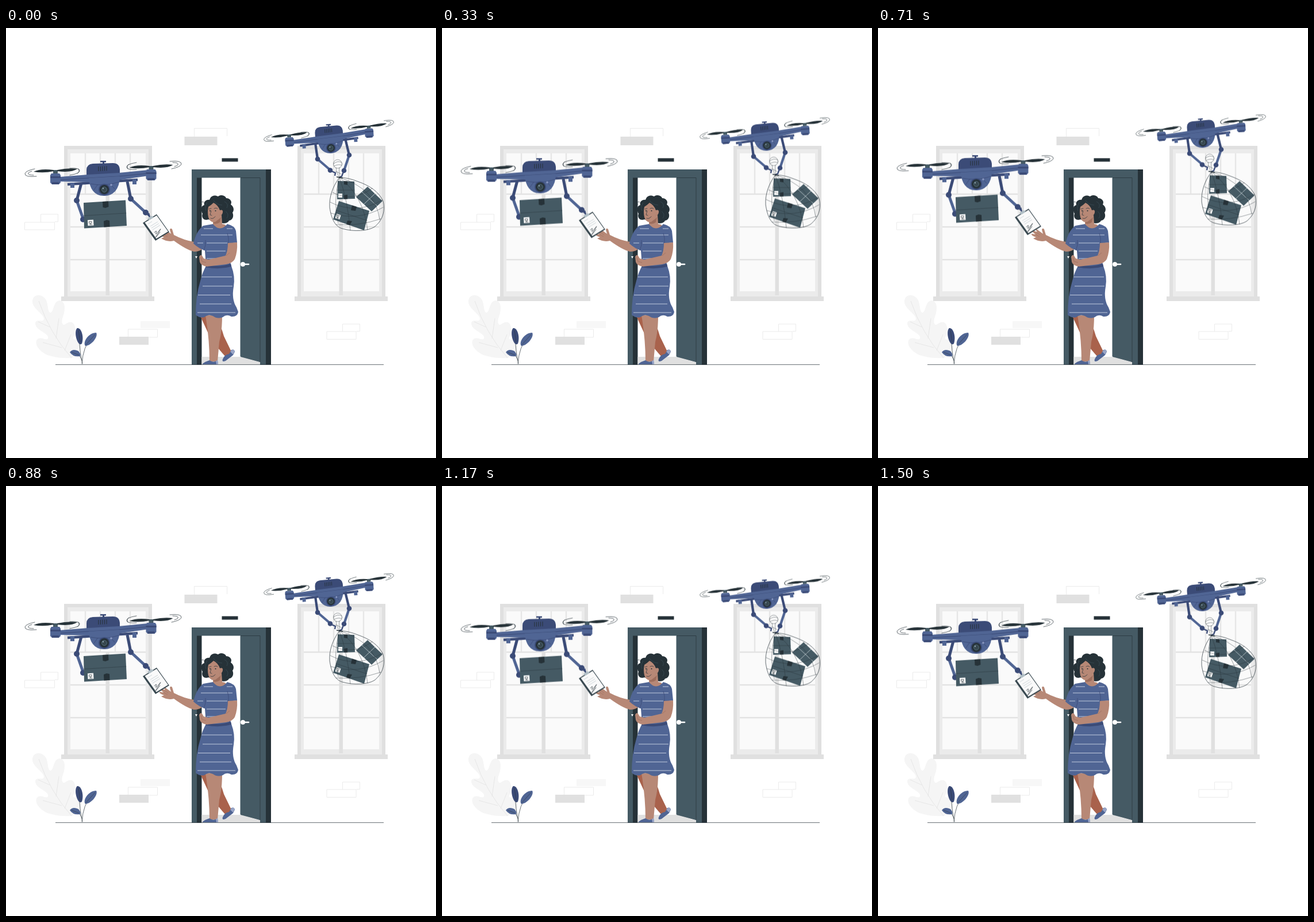
These frames come from a looping animation (748x748 px, 1540 ms). An HTML page without scripts:

```html
<!DOCTYPE html>
<html lang="en">
<head>
<meta charset="utf-8">
<title>Drone delivery</title>
<style>
  html, body { margin: 0; width: 100%; height: 100%; overflow: hidden; background: #fff; }
  svg { display: block; width: 100vw; height: 100vh; }
  .fly { animation: fly 1540ms linear infinite; }
  @keyframes fly {
    0%, 98.5%, 100% { transform: translateY(0); }
    47.4% { transform: translateY(-10px); }
  }
  .blue { fill: #506594; }
  .navy { fill: #3b4b77; }
  .slate { fill: #455a64; }
  .ink { fill: #263238; }
  .skin { fill: #b78876; }
  .grey { fill: #e0e0e0; }
  .pale { fill: #f5f5f5; }
  .line { fill: none; stroke: #263238; stroke-width: .7; stroke-linecap: round; stroke-linejoin: round; }
  .thin { stroke-width: .45; }
  .brick { fill: none; stroke: #ebebeb; stroke-width: 1; }
  .arm { fill: none; stroke: #506594; stroke-width: 5; stroke-linejoin: round; }
  .dark { stroke: #3b4b77; }
  .far .arm { stroke-width: 4.2; }
</style>
</head>
<body>
<svg viewBox="0 0 748 748" xmlns="http://www.w3.org/2000/svg">
  <defs>
    <g id="window">
      <path class="grey" d="M101 205h153v262H101z"/>
      <path fill="#ebebeb" d="M107 211h141v256H107z"/>
      <path fill="#fafafa" d="M112 218h131v240H112z"/>
      <path d="M138 218v71M164 218v71M190 218v71M216 218v71" stroke="#e6e6e6" stroke-width="2.4"/>
      <path d="M112 289h131M112 346h131M112 403h131" stroke="#e3e3e3" stroke-width="2.6"/>
      <path class="grey" d="M173.500 289h6.500v176h-6.500zM96 467h162v8H96z"/>
    </g>

    <g id="rotor">
      <path class="blue" d="M-7 4h14l2 3v13l-3 3H-6l-3-3V7z"/>
      <path class="navy" d="M-9 9H9v3H-9zM-6 19H6v4H-6z"/>
      <path class="slate" d="M-4-2h8v6h-8z"/>
      <path class="ink" d="M-3 0Q-20 4-38 1Q-26-5-3-2zM3-2Q22-6 38-4Q28 3 3 0z"/>
    </g>
    <path id="swirl" class="line" d="M33-9Q54-11 53-4Q51 1 36 4M38-7Q49-7 47-3Q45-1 41 0M-25-7Q-44-4-42 2Q-40 6-25 5M-38-4Q-43-2-40 4"/>

    <g id="drone">
      <path d="M107 272 229 264" stroke="#3b4b77" stroke-width="4.500"/>
      <path class="blue" d="M112 269h7v9h-7zM220 263h7v9h-7z"/>
      <path class="navy" d="M168 233h3v5h-3zM164 231h10v2.500h-10z"/>
      <path class="navy" d="M140 256V247Q140 237 151 236L186 235Q197 235 198 246V254z"/>
      <path class="blue" d="M93 259 143 255 196 252 247 247 248 257 200 264 142 268 94 267z"/>
      <path d="M95 264 144 261 196 258 247 253" fill="none" stroke="#3b4b77" stroke-width="1"/>
      <path class="blue" d="M144 261 198 258Q198 274 190 284Q181 293 170 292Q158 292 151 283Q145 275 144 261z"/>
      <path d="M147 271Q171 276 196 268M153 282Q158 274 160 272M189 280 182 272" fill="none" stroke="#3b4b77" stroke-width=".8"/>
      <path d="M161 241v8M164.500 241v8M168 240.700v8M171.500 240.500v8M175 240.300v8" stroke="#263238" stroke-width="1"/>
      <circle class="navy" cx="171" cy="281" r="10"/>
      <circle class="ink" cx="171" cy="281" r="8"/>
      <circle cx="171" cy="281" r="4.500" fill="#37474f" stroke="#607d8b" stroke-width=".7"/>
      <circle cx="169" cy="279" r="1.200" fill="#90a4ae"/>
      <circle cx="183" cy="273" r="1.800" fill="#8c9bc4"/>
      <use href="#rotor" x="86" y="249"/>
      <use href="#rotor" x="252.500" y="242"/>
      <use href="#swirl" transform="translate(86 249) rotate(180)"/>
      <use href="#swirl" x="252" y="241"/>
    </g>

    <g id="label">
      <path fill="#fff" d="M0 0 10-.5 10.500 9.500 .5 10z"/>
      <path class="line" d="M3 2.500h4v3H3zM5 6v2M3 8h5"/>
    </g>

    <path id="dress" d="M360 341Q372 356 385 341Q398 344 400 353L402 373 387 375Q386 396 392 414Q399 432 396 450Q392 472 401 486L404 494Q402 503 392 502Q384 497 377 503Q368 507 360 501Q352 497 345 503Q337 505 330 499Q330 466 338 440Q342 424 348 414L346 387Q336 384 326 375Q331 353 343 344z"/>
    <clipPath id="cloth"><use href="#dress"/></clipPath>
  </defs>

  <rect width="748" height="748" fill="#fff"/>

  <!-- Wall -->
  <use href="#window"/>
  <use href="#window" x="406"/>
  <path class="grey" d="M310.500 189h57v15h-57zM197 537h51v14h-51z"/>
  <path fill="#f7f7f7" d="M234 510h51v12h-51z"/>
  <path class="brick" d="M327.500 189v-14.500h57V188M32.500 338h52v13h-52zM60.500 338v-14h30v13h-6M212.500 537v-13h51v14h-15M558 528h51v13.500h-51zM585.500 528v-13h30v12.500h-6"/>
  <path class="ink" d="M375.500 226.500h28v6h-28z"/>

  <!-- Plants -->
  <path class="pale" d="M114 574Q95 575 80 571C60 567 48 550 54 542C60 535 70 545 73 540C76 530 50 527 51 513C53 505 65 513 66 506C66 497 45 488 46 475C47 463 61 461 69 472C74 480 72 496 78 495C84 492 82 474 94 474C106 477 102 495 98 505C96 515 99 519 105 514C115 507 122 515 120 528C119 537 114 540 119 542Q130 541 132 553Q131 567 114 574z"/>
  <path d="M57 475Q76 531 114 574M76 520 56 511M87 540 92 505M97 556 64 547M102 561 113 533" fill="none" stroke="#e0e0e0" stroke-width=".7"/>
  <path class="line" d="M127 532Q128 565 133 584M149 538Q134 554 132 584M117 564Q129 567 132 578"/>
  <path class="navy" d="M124 522C131 521 136 537 132 549Q129 552 126 548C121 541 119 526 124 522z"/>
  <path class="blue" d="M157 530C161 537 148 553 138 553C133 547 143 530 157 530zM111 564Q116 557 126 562Q131 568 129 571Q117 573 111 564z"/>
  <path d="M126 525 129 547M155 533 139 551M114 564 127 569" stroke="#263238" stroke-width=".5"/>

  <!-- Door -->
  <path class="slate" d="M323 246h138v340H323z"/>
  <path class="ink" d="M452 246h9v340h-9zM332 260.500h8.500V586H332z"/>
  <path fill="#fff" d="M340.500 260.500H408V586h-67.500z"/>
  <path class="grey" d="M340.500 572H408l34 9v5H340.500z"/>
  <path class="slate" d="M407.500 260.500H442V581l-34.500-10z"/>
  <path d="M442 581V260.500M408 260.500h34" fill="none" stroke="#263238" stroke-width=".7"/>
  <circle cx="412" cy="411" r="4" fill="#fff"/>
  <path d="M412 411h10" stroke="#fff" stroke-width="2.600" stroke-linecap="round"/>
  <path fill="#fff" d="M329 397h4l-2 4z"/>
  <path d="M86 585.600H657" stroke="#263238" stroke-width=".7"/>

  <!-- Woman -->
  <g>
    <path fill="#a9624c" d="M337 499 365 500Q373 515 379 536L394 567 383 573Q358 546 349 525z"/>
    <path class="blue" d="M377 576Q380 568 388 567L392 560Q397 558 398 563L395 569 382 579Q375 582 377 576z"/>
    <path fill="#9aa6c8" d="M390 563 395 559 398 562 395 568z"/>
    <path class="skin" d="M347 500H376Q376 528 371 546L368 580H354Q354 541 347 500z"/>
    <path class="blue" d="M342 584Q347 580 354 578Q361 583 368 578L369 585H342z"/>
    <path fill="#9aa6c8" d="M365 579 368 578 369 585H366z"/>

    <path class="ink" d="M354 299C356 291 364 290 369 293C374 289 382 292 383 296C390 296 394 302 391 307C397 311 397 318 394 321C397 328 394 334 388 335C385 341 374 341 370 337L352 333C345 336 339 330 342 323C338 317 339 309 345 308C343 303 348 298 354 299z"/>
    <path class="line" d="M344 303q-4-2-5 2M341 306q-4 2-1 4"/>
    <path class="skin" d="M360 330 375 325 376 341Q386 342 381 348Q370 356 360 344z"/>
    <path fill="#9d6e5d" d="M361 336Q369 335 374 329L372 338Q366 342 361 340z"/>
    <path class="skin" d="M352 311Q357 308 361 304Q369 308 372 317Q378 315 377 321Q376 326 372 326Q370 336 361 338Q354 337 352 329Q350 320 352 311z"/>
    <path class="line" d="M353 315l4-1M362 314q3-2 6 0M357 318l-2 7 3 1M356 331q4 2 8-3"/>
    <circle class="ink" cx="355" cy="318" r="1"/>
    <circle class="ink" cx="364.500" cy="318" r="1"/>
    <path d="M361 300q6 8 15 8M380 302q8 4 4 11M350 304q-5 7-2 14M382 319q7 5 2 12" fill="none" stroke="#455a64" stroke-width=".5"/>

    <path class="skin" d="M327 372Q309 369 292 360L289 350Q286 347 285 351L287 358 276 350Q273 350 277 355L269 352Q266 353 274 359L267 358Q266 361 275 364L270 366Q281 373 292 370Q314 386 327 389Q337 390 345 381z"/>
    <path d="M275 355 282 360M274 359 281 363" stroke="#9d6e5d" stroke-width=".6"/>

    <use href="#dress" class="blue"/>
    <g clip-path="url(#cloth)" stroke="#cfd6e6" stroke-width=".9" fill="none">
      <path d="M344 349h16M384 349h10M339 360h55M333 374h10M349 374h36M349 388h33M349 401h38M339 433h54M342 449h52M334 464.500h56M337 480h55M333 495h66"/>
    </g>
    <path class="navy" d="M349 412Q370 417 391 410L392 415Q371 421 347 416z"/>
    <path d="M344 387Q348 379 347 369M387 374Q388 365 385 357" fill="none" stroke="#3b4b77" stroke-width=".8"/>
    <path class="skin" d="M386 374 402 373Q403 389 398 402Q394 409 383 411L349 415Q339 413 337 407L336 398Q338 393 341 396L344 401 352 403 382 396Q386 387 386 374z"/>
    <path d="M339 399 341 406 348 408M383 396 389 391" fill="none" stroke="#9d6e5d" stroke-width=".7"/>
  </g>

  <!-- Near drone with parcel and clipboard -->
  <g class="fly">
    <path class="arm dark" d="M131 270 123 300"/>
    <path class="arm" d="M123 300 135 334"/>
    <path class="arm dark" d="M211 267 217 297"/>
    <path class="arm" d="M217 297 243 321"/>
    <g class="navy">
      <circle cx="123" cy="300" r="5"/><circle cx="134" cy="333" r="5"/>
      <circle cx="217" cy="297" r="5"/><circle cx="243" cy="321" r="5"/>
    </g>
    <path d="M243 321 250 328M248 322 250 329" stroke="#3b4b77" stroke-width="2.500"/>
    <use href="#drone"/>
    <path class="slate" d="M135 304 208 299.500 210 344 136 348.500z"/>
    <path class="line thin" d="M135.500 326.500 209 322"/>
    <path class="ink" d="M168 302 178 301.400 178.500 311 173 313 168.500 312zM170 336 175 334 180 335 180.500 345.800 170.500 346.500z"/>
    <use href="#label" x="142" y="334"/>
    <path fill="#37474f" d="M238 339 262 324 284 355 260 370z"/>
    <path fill="#fafafa" d="M241.500 338.500 262 326 282 354 261.500 366.500z"/>
    <path fill="#b0bec5" d="M246 331 254 326.500 257 329.500 249 334.500z"/>
    <path d="M247 341 254 336.500M251 345 264 337M253 348 266 340M255 351 268 343" stroke="#b0bec5" stroke-width=".6"/>
    <path class="line" d="M258 356q5-6 3 0t5-3-2 5 4-3"/>
  </g>

  <!-- Far drone with netted parcels -->
  <g class="fly far">
    <path class="arm dark" d="M538 200 542 228"/>
    <path class="arm" d="M542 228 564 247"/>
    <path class="arm dark" d="M590 192 597 221"/>
    <path class="arm" d="M597 221 588 248"/>
    <g class="navy">
      <circle cx="542" cy="228" r="4.300"/><circle cx="564" cy="247.500" r="4.300"/>
      <circle cx="597" cy="221" r="4.300"/><circle cx="588" cy="248" r="4.300"/>
    </g>
    <path d="M566 249 573 252 572 257M587 250 584 258 579 260" fill="none" stroke="#3b4b77" stroke-width="2.300"/>
    <use href="#drone" transform="translate(562.500 193) rotate(-4) scale(.836) translate(-169 -262)"/>

    <path class="slate" d="M577 266 606 267 607 297 576 298z"/>
    <path class="ink" d="M588 266.400 594 266.600 594 273 588 272zM588 291 594 290 594 297.400 588 297.600z"/>
    <path class="slate" d="M629 276 655 301 636 319 609 294z"/>
    <path d="M619 285 646 310M642 288 622 307" stroke="#cfd8dc" stroke-width=".8"/>
    <path class="slate" d="M579 301 632 318 623 352 569 333z"/>
    <path class="line thin" d="M574 317 628 335M576 282 606 282"/>
    <path class="ink" d="M602 308.500 610 311 608 318 600 317zM594 335 602 336 598 343 592 341z"/>
    <g transform="translate(575 323) rotate(20) scale(.8)"><use href="#label"/></g>
    <path fill="#fff" d="M578 288h7v7h-7z"/>
    <path class="line" d="M580 260C568 276 562 294 563 312C566 332 572 345 585 349C606 355 630 353 641 346C656 334 660 317 656 301C648 284 632 274 612 267Q595 260 580 260"/>
    <path class="line thin" d="M580 260Q568 303 578 340M580 260Q594 298 599 352M580 260Q622 292 629 351M580 260Q643 279 650 333M568 286Q602 304 637 279M564 303Q609 326 655 299M565 322Q613 337 656 312M574 342Q614 345 652 332"/>
    <circle class="line thin" cx="577" cy="236.500" r="7.500"/>
    <path class="line thin" d="M570 236Q577 230 584 234M571 240Q579 236 584 239M574 243Q575 253 580 260M580 243Q578 253 582 260M573 249 583 254"/>
    <path d="M575 259 586 261" stroke="#263238" stroke-width="1.600"/>
  </g>
</svg>
</body>
</html>
```
